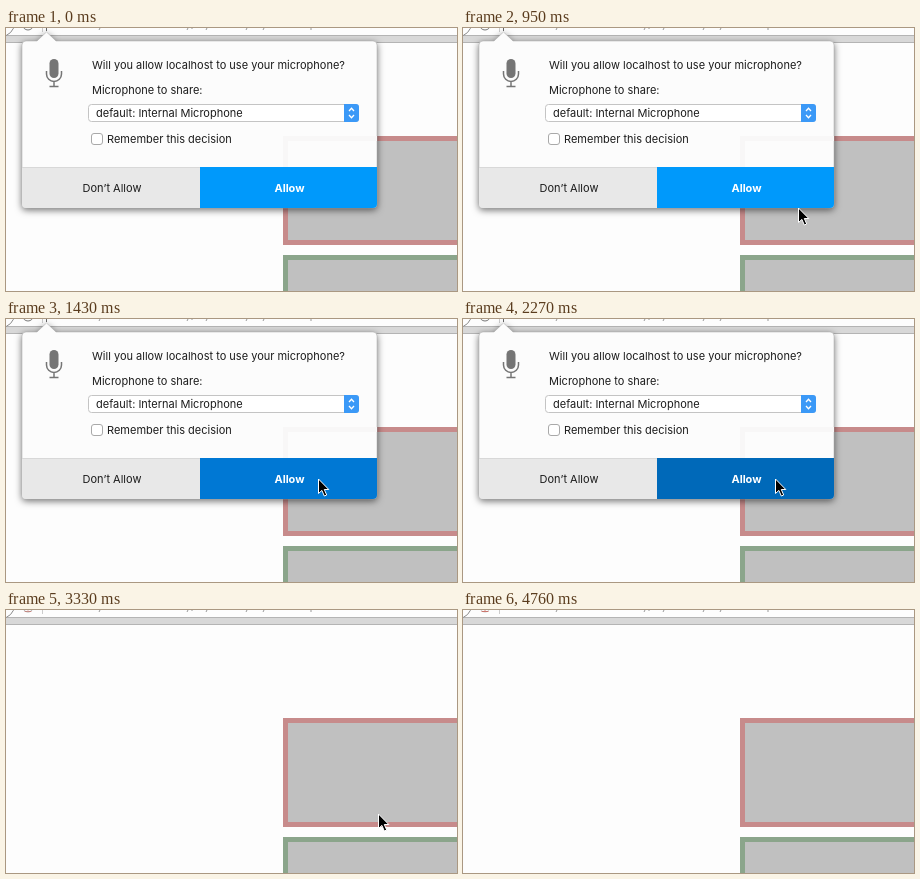
Animation of 451 by 263 pixels, one loop 4.86 s. Source, as an HTML page:

```html
<!DOCTYPE html>
<html lang="en">
<head>
<meta charset="utf-8">
<title>Microphone permission</title>
<style>
  html, body { margin: 0; width: 100%; height: 100%; overflow: hidden; background: #fdfdfd; }
  svg { display: block; width: 451px; height: 263px; }
  text { font: 11px Inter, "Open Sans", sans-serif; fill: #1c1c1c; }
  .mid { text-anchor: middle; }
  .strong { font-weight: 700; fill: #fff; }
  .box { fill: #c0c0c0; stroke-width: 5; }
  .line { fill: none; stroke: #777; }

  .popup, .allow, .cursor, .info, .live { animation: 4860ms step-end infinite; }
  .popup { animation-name: popup; }
  .shadow { filter: drop-shadow(0 2px 3.5px rgba(0, 0, 0, .55)); }
  .allow { animation-name: allow; }
  .cursor { animation-name: cursor; }
  .info { animation-name: info; }
  .live { animation-name: live; }

  @keyframes popup {
    0% { visibility: visible; }
    51.44%, 100% { visibility: hidden; }
  }
  @keyframes allow {
    0% { fill: #0099fb; }
    22.016% { fill: #0078d4; }
    46.708%, 100% { fill: #0069b9; }
  }
  @keyframes cursor {
    0% { visibility: hidden; transform: translate(366px, 216px); }
    14.815% { visibility: visible; transform: translate(366px, 216px); }
    17.284% { visibility: visible; transform: translate(350px, 197px); }
    19.547% { visibility: visible; transform: translate(335px, 180px); }
    22.016% { visibility: visible; transform: translate(324px, 171px); }
    24.486% { visibility: visible; transform: translate(317px, 165px); }
    26.955% { visibility: visible; transform: translate(314px, 162px); }
    29.424% { visibility: visible; transform: translate(312px, 160px); }
    63.58% { visibility: visible; transform: translate(318px, 164px); }
    66.049% { visibility: visible; transform: translate(340px, 180px); }
    68.519% { visibility: visible; transform: translate(372px, 204px); }
    70.988% { visibility: visible; transform: translate(398px, 225px); }
    73.457% { visibility: visible; transform: translate(412px, 236px); }
    75.926%, 100% { visibility: hidden; transform: translate(412px, 236px); }
  }
  @keyframes live {
    0% { opacity: 0; }
    51.44% { opacity: 1; }
    63.58% { opacity: .85; }
    66.049% { opacity: .65; }
    68.519% { opacity: .4; }
    70.988% { opacity: .2; }
    73.457% { opacity: 0; }
    93.004% { opacity: .15; }
    95.473% { opacity: .35; }
    97.942%, 100% { opacity: .6; }
  }
  @keyframes info {
    0% { opacity: 1; }
    51.44% { opacity: 0; }
    63.58% { opacity: .15; }
    66.049% { opacity: .35; }
    68.519% { opacity: .6; }
    70.988% { opacity: .8; }
    73.457% { opacity: 1; }
    93.004% { opacity: .85; }
    95.473% { opacity: .65; }
    97.942%, 100% { opacity: .4; }
  }
</style>
</head>
<body>
<svg viewBox="0 0 451 263">
  <rect width="451" height="263" fill="#fdfdfd"/>

  <!-- toolbar -->
  <rect y="7" width="451" height="8" fill="#d8d8d8"/>
  <path class="line" d="M0 7.5H451M0 14.5H451" style="stroke:#b4b4b4"/>
  <circle class="line" cx="-5" cy="-5" r="13.5" style="fill:#fdfdfd;stroke:#8a8a8a"/>
  <path class="line" d="M36.5 0V4" style="stroke:#ccc"/>
  <path class="line" d="M94 0l-1 2M182 0l-1 2M186 0v1M201 0l-1 2M241 0l-1 2M258 0l-1 2M305 0v2" style="stroke:#999"/>
  <circle class="line info" cx="22" cy="-3.5" r="5.5"/>
  <path class="line live" d="M22 0V2M18.5 1.5H25.5" style="stroke:#c0392b"/>

  <!-- page -->
  <rect class="box" x="279.5" y="110.5" width="200" height="104" stroke="#c78b8b"/>
  <rect class="box" x="279.5" y="229.5" width="200" height="104" stroke="#8ba58b"/>

  <g class="popup">
    <path class="line" d="M40.500 0V3" style="stroke:#666"/>
    <path class="shadow" fill="#fcfcfc" stroke="#a8a8a8" stroke-width=".5"
      d="M20 13H31L40.500 4L50 13H367a4 4 0 0 1 4 4V176a4 4 0 0 1-4 4H20a4 4 0 0 1-4-4V17a4 4 0 0 1 4-4z"/>
    <path d="M279.500 139V110.500H371" fill="none" stroke="#f8f7f7" stroke-width="5"/>

    <rect x="43.500" y="31" width="9" height="19" rx="4.500" fill="#757575"/>
    <path class="line" d="M40.500 43V46a7.500 7.500 0 0 0 15 0V43M48 53.500V58M43.500 58.500H52.500" style="stroke:#757575;stroke-width:1.500"/>

    <text x="86" y="41">Will you allow localhost to use your microphone?</text>
    <text x="86" y="66">Microphone to share:</text>

    <rect x="82.500" y="76.500" width="270" height="17" rx="3" fill="#fff" stroke="#c4c4c4"/>
    <path d="M338 76H350a3 3 0 0 1 3 3V91a3 3 0 0 1-3 3H338z" fill="#3b99f7"/>
    <path d="M343 83l2.500-2.700 2.500 2.700M343 87l2.500 2.700 2.500-2.700" fill="none" stroke="#fff" stroke-width="1.300"/>
    <text x="90" y="89">default: Internal Microphone</text>

    <rect x="85.500" y="105.500" width="11" height="11" rx="2.500" fill="#fff" stroke="#a9a9a9"/>
    <text x="101" y="115">Remember this decision</text>

    <path d="M16 139H194V180H20a4 4 0 0 1-4-4z" fill="#e8e8e8"/>
    <path class="line" d="M16 139.500H194" style="stroke:#d8d8d8"/>
    <path class="allow" d="M194 139H371V176a4 4 0 0 1-4 4H194z"/>
    <text class="mid" x="106" y="164">Don’t Allow</text>
    <text class="mid strong" x="283.500" y="164">Allow</text>
  </g>

  <path class="cursor" d="M.5 0V14.500L3.900 11.400L6.300 17L8.700 16L6.300 10.500H10.800z"
    fill="#000" stroke="#fff" stroke-width="1" stroke-linejoin="round"/>
</svg>
</body>
</html>
```
